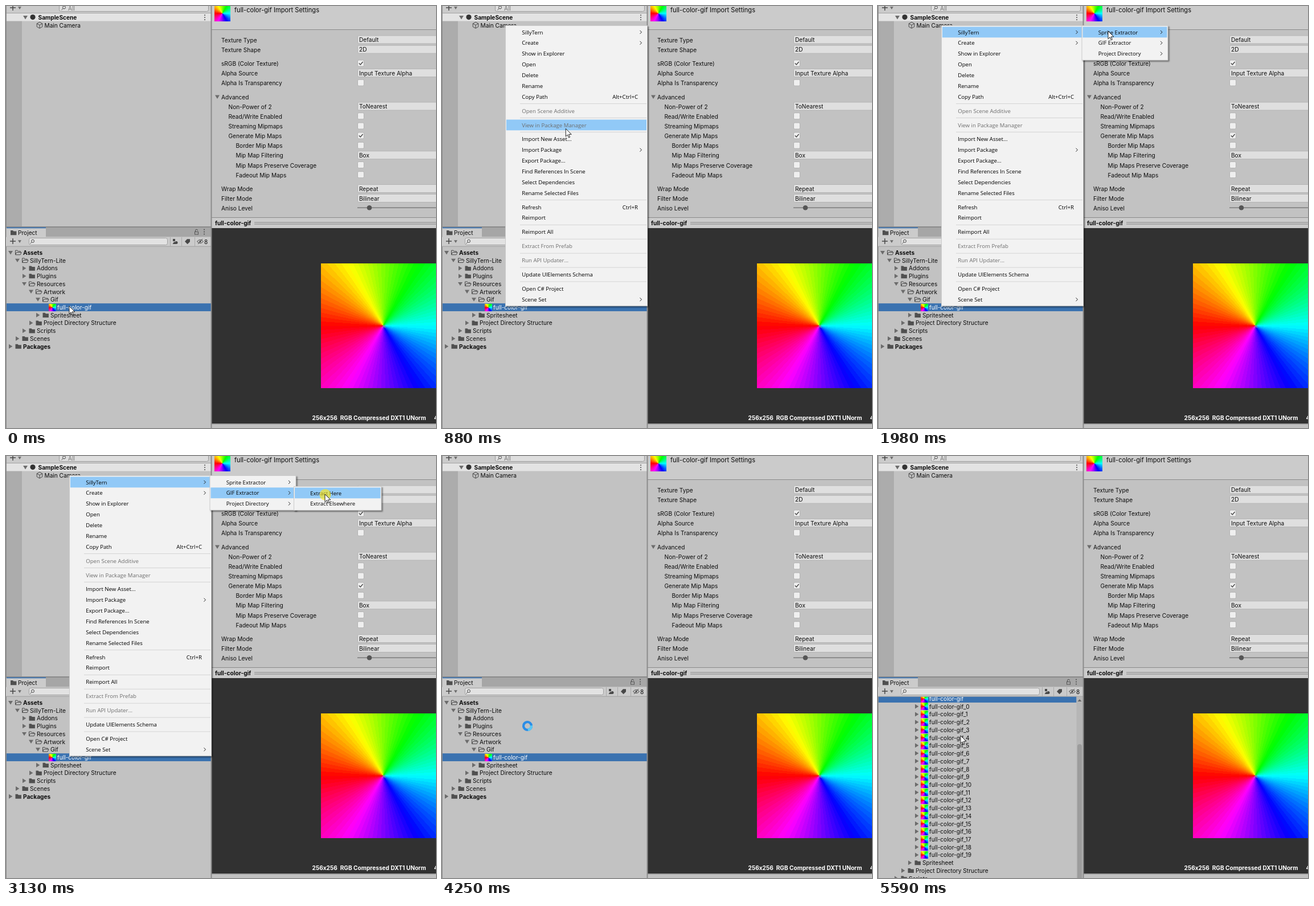
Write an HTML page that moves like this. It is 755 by 741 pixels and loops after 6810 ms.

```html
<!DOCTYPE html>
<html lang="en">
<head>
<meta charset="utf-8">
<title>Extract frames</title>
<style>
html, body { margin: 0; width: 100%; height: 100%; overflow: hidden; background: #c2c2c2; }
svg { display: block; width: 755px; height: 741px; }
text { white-space: pre; font: 10.15px Inter, sans-serif; fill: #0c0c0c; }
.b { font-weight: 700; }
.title { font-size: 11.1px; }
.w { fill: #fff; }
.dim { fill: #777; }
.menu { filter: drop-shadow(2.5px 2.5px 1.2px rgba(0, 0, 0, .45)); }
.menu text { font: 9.65px "Open Sans", "Noto Sans", sans-serif; fill: #000; }
.menu text.dim { fill: #6d6d6d; }
.menu text.end { text-anchor: end; }
.wheel { height: 100%; }
.line { fill: none; stroke: #484848; }
</style>
</head>
<body>
<svg id="stage" viewBox="0 0 755 741"></svg>
<script>
const LOOP = 6810, ROW = 13.72, ITEM = 18.86, GAP = 6.05, SCROLL = 103, FACET = 4;
const $ = id => document.getElementById(id);

// ---- drawing helpers ----
const rect = (x, y, w, h, fill, more = '') =>
  `<rect x="${x}" y="${y}" width="${w}" height="${h}" fill="${fill}" ${more}/>`;
const path = (d, more = 'class="line"') => `<path d="${d}" ${more}/>`;
const text = (x, y, s, cls = '', drop = 4) =>
  `<text x="${x}" y="${y + drop}" class="${cls}">${s}</text>`;
const down = (x, y, r = 4) => path(`M${x - r} ${y - r * .75}h${2 * r}l${-r} ${r * 1.6}z`, 'fill="#6c6c6c"');
const right = (x, y) => path(`M${x - 3} ${y - 4}v8l6.4 -4z`, 'fill="#6c6c6c"');
const plus = (x, y) => path(`M${x - 5} ${y}h10M${x} ${y - 5}v10`, 'class="line" stroke-width="1.5"') + down(x + 12, y + .5, 3);
const dots = (x, y) => [-4, 0, 4].map(d => rect(x - .8, y + d - .8, 1.7, 1.7, '#484848')).join('');
const lens = (x, y) =>
  `<circle cx="${x + 1}" cy="${y - 1}" r="2.5" class="line"/>` + path(`M${x - 1} ${y + 1}l-2.6 2.6`);
// narrow fan of flat hues, red at the left
const fan = Array.from({ length: 360 / FACET }, (_, i) =>
  `hsl(${(i + .5) * FACET} 100% 50%) ${i * FACET}deg ${(i + 1) * FACET}deg`).join();
const wheel = (x, y, size) =>
  `<foreignObject x="${x}" y="${y}" width="${size}" height="${size}">` +
  `<div class="wheel" style="background:conic-gradient(from 270deg,${fan})"></div></foreignObject>`;
const folder = (x, y) => path(`M${x} ${y - 4}h4l1.4 1.6h5v6.6h-10.4z`, 'fill="#505050"');
const openFolder = (x, y) =>
  path(`M${x + .5} ${y + 3.6}v-7.4h3.6l1.2 1.6h4v2M${x + .5} ${y + 3.8}l2 -4.2h8.6l-2 4.2z`);

// ---- panels ----
function hierarchy() {
  return rect(0, 0, 360, 388, '#c2c2c2') + rect(0, 13, 28, 375, '#acacac') +
    rect(0, 0, 360, 12.5, '#cbcbcb') + rect(0, 12, 360, 1, '#a4a4a4') +
    rect(0, 13, 360, 13.5, '#e3e3e3') +
    plus(12, 3) +
    rect(93.5, -6.5, 262, 16, '#dedede', 'rx="3" stroke="#9a9a9a"') +
    lens(101, 3.5) + text(109, 3.5, 'All', 'dim') +
    down(34, 20) + '<circle cx="47" cy="19.6" r="4.6" fill="#333"/>' +
    text(56.5, 19.6, 'SampleScene', 'b') + dots(349, 20) +
    path('M59 28.3l4.8 2.6v5.6l-4.8 2.6l-4.8 -2.6v-5.6zM54.2 30.9l4.8 2.6l4.8 -2.6M59 33.5v5.6') +
    text(67.5, 33.5, 'Main Camera');
}

function projectBar() {
  return rect(0, 387, 360, 2, '#8b8b8b') + rect(0, 389, 360, 16.5, '#a6a6a6') +
    rect(1, 389, 69, 17, '#cbcbcb') + rect(1, 388.5, 69, 1.8, '#3a72b0') +
    folder(8, 398) + text(21, 398, 'Project') +
    rect(331.5, 396.5, 6, 4.5, 'none', 'stroke="#555"') + path('M332.5 396v-1.6a2 2 0 0 1 4 0') + dots(348, 396.5) +
    rect(0, 405.5, 360, 16.5, '#cbcbcb') + rect(0, 421.6, 360, 1, '#a0a0a0') +
    plus(12, 413) + rect(40.5, 407.5, 243, 12, '#e2e2e2', 'rx="3" stroke="#a0a0a0"') + lens(46, 413.8) +
    [288, 308, 331].map(x => rect(x, 406, 1, 16, '#a9a9a9')).join('') +
    path('M293 409h4v4h-4zM292.5 418l3 -4.5l3 4.5z', 'fill="#484848"') + '<circle cx="299" cy="415.5" r="2.5" fill="#484848"/>' +
    path('M314 413.5l4 -4.2h5v4.8l-4.4 4.2z', 'fill="#484848"') +
    path('M335.5 413.5q5.5 -6 11 0q-5.5 6 -11 0M337 418l8 -9') +
    '<circle cx="341" cy="413.5" r="1.6" fill="#484848"/>' + text(348, 413.5, '8');
}

// name, depth, kind: open / shut / pic
const HEAD = [['Assets', 0, 'open', 'b'], ['SillyTern-Lite', 1, 'open'], ['Addons', 2, 'shut'], ['Plugins', 2, 'shut'],
  ['Resources', 2, 'open'], ['Artwork', 3, 'open'], ['Gif', 4, 'open'], ['full-color-gif', 5, 'pic', 'w']];
const TAIL = [['Spritesheet', 4, 'shut'], ['Project Directory Structure', 3, 'shut'], ['Scripts', 2, 'shut'],
  ['Scenes', 1, 'shut'], ['Packages', 0, 'shut', 'b']];
const COUNT = 20;

function treeRow([name, depth, kind, cls = ''], i) {
  const x = 8 + 12 * depth, y = 433 + ROW * i;
  const arrow = kind == 'open' ? down(x, y) : cls == 'w' ? '' : right(x, y);
  const icon = kind == 'open' ? openFolder(x + 8, y) : kind == 'shut' ? folder(x + 8.5, y) : wheel(x + 7, y - 6.5, 13);
  return arrow + icon + text(x + 22, y, name, cls);
}

function tree() {
  const kids = Array.from({ length: COUNT }, (_, n) => treeRow(['full-color-gif_' + n, 5, 'pic'], 8 + n));
  return rect(0, 422.5, 360, 319, '#c2c2c2') +
    `<g clip-path="url(#treeBox)"><g id="rows">` +
    rect(1, 522.2, 359, ROW, '#3a72b0', 'id="pick"') +
    HEAD.map(treeRow).join('') +
    `<g id="kids">${kids.join('')}</g>` +
    `<g id="tail">${TAIL.map((r, i) => treeRow(r, 8 + i)).join('')}</g></g>` +
    `<g id="bar">${rect(348.5, 422.5, 11, 319, '#b6b6b6')}` +
    path('M350.5 431h7l-3.5 -4z', 'fill="#666"') +
    rect(350, 436, 8, 400, '#9c9c9c', 'id="thumb" rx="4"') + '</g></g>' + rect(0, 0, 1, 741, '#8b8b8b');
}

const drop = (y, s) => rect(617.5, y - 7.5, 150, 14, '#dfdfdf', 'stroke="#b4b4b4" rx="2"') + text(620, y - .5, s);
const check = (y, on) => rect(617.5, y - 6, 11, 11, '#efefef', 'stroke="#b2b2b2" rx="2"') +
  (on ? path(`M619.8 ${y - .6}l2.5 2.6l4.3 -5`, 'class="line" stroke-width="1.4"') : '');

function inspector() {
  const rows = [
    [378, 59.5, 'Texture Type', 'Default'], [378, 76.7, 'Texture Shape', '2D'],
    [378, 101, 'sRGB (Color Texture)', true], [378, 118, 'Alpha Source', 'Input Texture Alpha'],
    [378, 135.2, 'Alpha Is Transparency', false], [378, 159.5, 'Advanced'],
    [390.5, 176.5, 'Non-Power of 2', 'ToNearest'], [390.5, 193.7, 'Read/Write Enabled', false],
    [390.5, 211, 'Streaming Mipmaps', false], [390.5, 228, 'Generate Mip Maps', true],
    [403.5, 245.2, 'Border Mip Maps', false], [403.5, 262.3, 'Mip Map Filtering', 'Box'],
    [403.5, 279.5, 'Mip Maps Preserve Coverage', false], [403.5, 296.7, 'Fadeout Mip Maps', false],
    [378, 321, 'Wrap Mode', 'Repeat'], [378, 338, 'Filter Mode', 'Bilinear'], [378, 355, 'Aniso Level']];
  const body = rows.map(([x, y, name, v]) => text(x, y, name) +
    (typeof v == 'string' ? drop(y, v) : v === undefined ? '' : check(y, v))).join('');
  return rect(360, 0, 395, 741, '#c2c2c2') + rect(360, 0, 395, 41, '#cbcbcb') + rect(360, 41, 395, 1, '#8a8a8a') +
    wheel(366, -1, 28) + text(401, 7.2, 'full-color-gif Import Settings', 'title') +
    down(371, 159.5) + body +
    rect(617, 353.5, 138, 1.5, '#7c7c7c') + '<circle cx="638" cy="354.3" r="4.3" fill="#555"/>' +
    rect(360, 371, 395, 1, '#8a8a8a') + rect(360, 372, 395, 18, '#cbcbcb') +
    text(367, 381, 'full-color-gif', 'b') + rect(436, 379.5, 319, 1, '#858585') + rect(436, 382.5, 319, 1, '#858585') +
    rect(360, 390, 395, 343, '#313131') + wheel(553, 452, 219) +
    path('M661 560l5 5m0 -5l-5 5', 'stroke="#8a8a8a" stroke-width="1.2"') +
    text(537.5, 722.5, '256x256  RGB Compressed DXT1 UNorm', 'b w') + text(751.5, 722.5, '4', 'b w') +
    rect(360, 733, 395, 1.5, '#8f8f8f') + rect(359.5, 0, 2, 741, '#8b8b8b');
}

// ---- menus: '-' rule, '~' greyed, '>' submenu, '|' shortcut ----
const MAIN = ['SillyTern>', 'Create>', 'Show in Explorer', 'Open', 'Delete', 'Rename', 'Copy Path|Alt+Ctrl+C', '-',
  '~Open Scene Additive', '-', '~View in Package Manager', '-', 'Import New Asset...', 'Import Package>',
  'Export Package...', 'Find References In Scene', 'Select Dependencies', 'Rename Selected Files', '-',
  'Refresh|Ctrl+R', 'Reimport', '-', 'Reimport All', '-', '~Extract From Prefab', '-', '~Run API Updater...', '-',
  'Update UIElements Schema', '-', 'Open C# Project', 'Scene Set>'];
const SUB = ['Sprite Extractor>', 'GIF Extractor>', 'Project Directory>'];
const LEAF = ['Extract Here', 'Extract Elsewhere'];
const PAD = 2.5;
const mids = {};

function menu(id, x, y, w, items) {
  const list = mids[id] = [];
  let mid = y + PAD + ITEM / 2, out = '';
  for (const item of items) {
    if (item == '-') {
      out += rect(x + 26, mid - ITEM / 2 + GAP / 2 - .5, w - 28, 1, '#d4d4d4');
      mid += GAP;
      continue;
    }
    const [name, keys] = item.replace(/[~>]/g, '').split('|');
    out += text(x + 29.2, mid, name, item[0] == '~' ? 'dim' : '', 3.6);
    if (keys) out += text(x + w - 17, mid, keys, 'end', 3.6);
    if (item.endsWith('>')) out += path(`M${x + w - 13.5} ${mid - 3}l3 3l-3 3`, 'fill="none" stroke="#222"');
    list.push(mid);
    mid += ITEM;
  }
  const h = mid - ITEM / 2 - y + PAD;
  return `<g id="${id}" class="menu">` +
    rect(x + .5, y + .5, w - 1, h - 1, '#f2f2f2', 'stroke="#cbcbcb"') +
    rect(x + 2, 0, w - 4, ITEM, '#91c9f7', `id="${id}Hot"`) + out + '</g>';
}

$('stage').innerHTML =
  `<defs><clipPath id="treeBox">${rect(0, 422.5, 360, 319, '#000')}</clipPath></defs>` +
  hierarchy() + tree() + projectBar() + inspector() +
  menu('main', 111, 34, 250, MAIN) + menu('sub', 357.5, 34, 152, SUB) + menu('leaf', 505, 53, 154.5, LEAF) +
  '<circle id="click" fill="#ffe619"/>' +
  path('M0 0V16L3.7 12.5L6.2 18.3L8.5 17.3L6.1 11.6H11.5Z', 'id="arrow" fill="#fff" stroke="#000"') +
  '<g id="busy"><circle r="7" fill="none" stroke="#2b8de6" stroke-width="4.2"/>' +
  path('M7 0A7 7 0 0 1 0 7', 'fill="none" stroke="#5cc9f5" stroke-width="4.2"') + '</g>';

// ---- timing ----
// bursts of change: first step, last step, number of steps
const BURSTS = [[260, 930, 13], [960, 1290, 8], [1620, 1700, 3], [1850, 1980, 4], [2160, 2260, 3], [2590, 2900, 8],
  [3130, 3130, 1], [3230, 3560, 8], [3740, 4380, 14], [4430, 4620, 4], [5050, 5230, 5], [5510, 5590, 3]];
// time, x, y of the pointer tip
const MOVES = [[0, 111, 527], [480, 111, 527], [590, 114, 522], [650, 114, 522], [930, 243, 139], [1100, 270, 66],
  [1290, 285, 42], [1810, 285, 42], [1980, 404, 44], [2110, 404, 44], [2260, 406, 71], [2650, 406, 71], [2900, 560, 67],
  [3330, 560, 67], [3560, 300, 330], [3700, 300, 330], [4040, 150, 474], [4430, 150, 474], [4620, 145, 502],
  [5480, 145, 502], [5590, 145, 491], [LOOP, 145, 491]];

function snap(t) {
  let last = 0;
  for (const [a, b, n] of BURSTS) {
    if (t < a) break;
    const step = (b - a) / (n - 1) || 1;
    last = a + Math.min(n - 1, Math.floor((t - a) / step + 1e-6)) * step;
  }
  return last;
}
const ramp = (t, a, b) => Math.min(1, Math.max(0, (t - a) / (b - a)));

function tip(t) {
  const i = Math.max(1, MOVES.findIndex(m => m[0] >= t));
  const [a, ax, ay] = MOVES[i - 1], [b, bx, by] = MOVES[i];
  const k = ramp(t, a, b);
  return [ax + (bx - ax) * k, ay + (by - ay) * k];
}

const show = (id, on) => $(id).style.display = on ? '' : 'none';
const fade = (id, v) => { show(id, v > 0); $(id).setAttribute('opacity', v); };
const place = (id, x, y, more = '') => $(id).setAttribute('transform', `translate(${x} ${y}) ${more}`);

function hot(id, y) {
  const mid = mids[id].find(m => Math.abs(m - y) <= ITEM / 2);
  show(id + 'Hot', mid !== undefined);
  if (mid !== undefined) $(id + 'Hot').setAttribute('y', mid - ITEM / 2);
}

function menus(t) {
  const gone = 1 - ramp(t, 3200, 3340);
  fade('main', ramp(t, 420, 560) * gone);
  fade('sub', ramp(t, 1580, 1700) * gone);
  fade('leaf', ramp(t, 2550, 2680) * gone);
  const [x, y] = tip(Math.min(t, 3230));
  hot('main', t >= 1620 ? mids.main[0] : y);
  hot('sub', x > 508 ? mids.sub[1] : x > 359 ? y : -99);
  hot('leaf', x > 508 ? y : -99);
}

function click(t) {
  const start = t < 3000 ? 260 : 3130;
  const age = t - start;
  fade('click', age >= 0 && age < 260 ? .65 * (1 - ramp(age, 90, 260)) : 0);
  const [x, y] = tip(start);
  $('click').setAttribute('cx', x + .5);
  $('click').setAttribute('cy', y + 1);
  $('click').setAttribute('r', 10 + ramp(age, 0, 260));
}

function project(t) {
  const open = t >= 4490, scroll = SCROLL * ramp(t, 5005, 5230);
  show('kids', open);
  show('bar', open);
  $('pick').setAttribute('width', open ? 347.5 : 359);
  place('tail', 0, open ? COUNT * ROW : 0);
  place('rows', 0, -scroll);
  $('thumb').setAttribute('y', 436 + 70 * scroll / SCROLL);
}

function draw(now) {
  const t = snap(now);
  const [x, y] = tip(t);
  const busy = t >= 4040 && t < 4490;
  show('arrow', !busy);
  show('busy', busy);
  place('arrow', x, y, 'scale(.86)');
  place('busy', x, y, `rotate(${(t - 4250) * .36})`);
  menus(t);
  click(t);
  project(t);
}

function tick() {
  draw(performance.now() % LOOP);
  requestAnimationFrame(tick);
}
tick();
</script>
</body>
</html>
```
